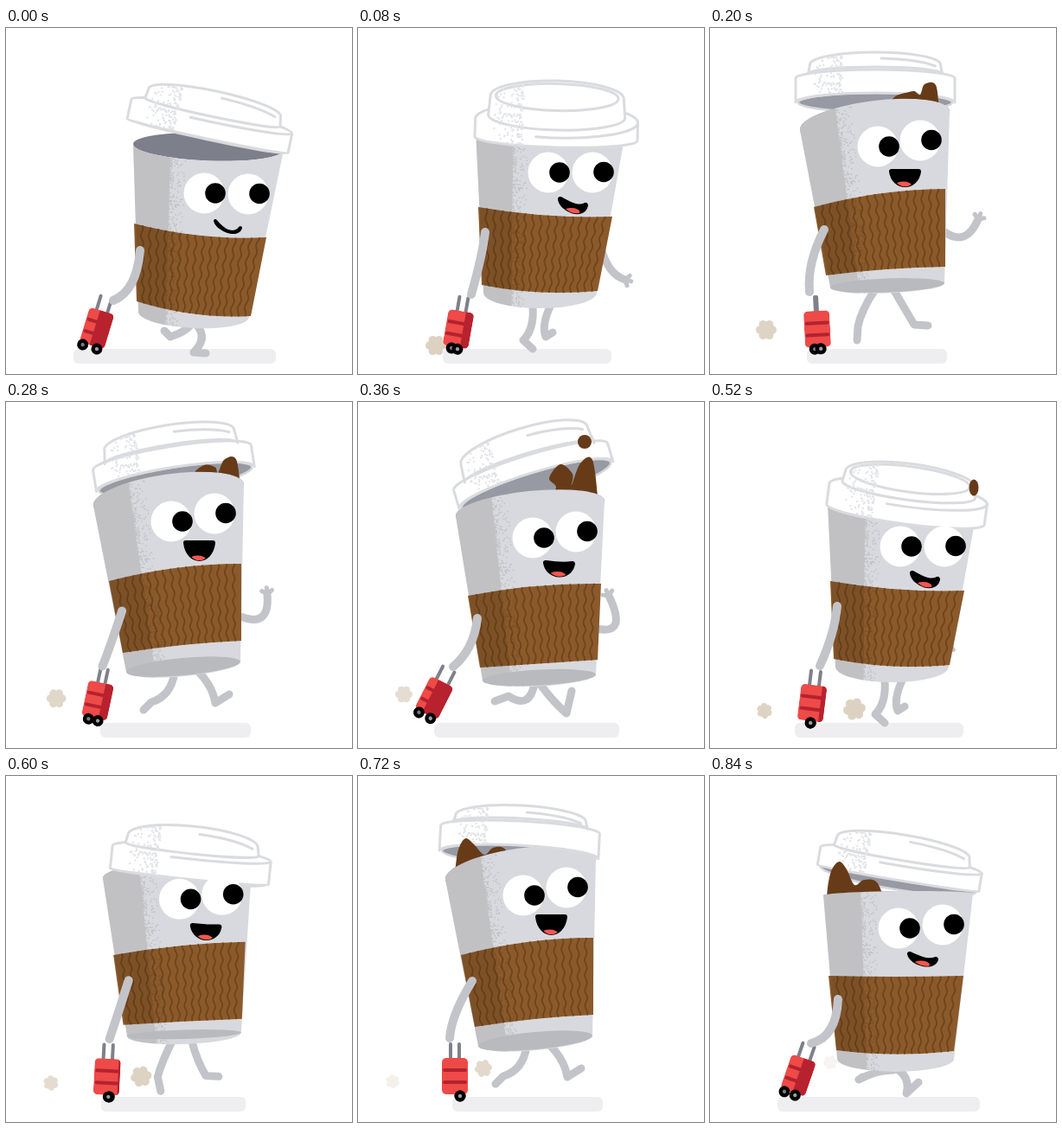
These frames come from a looping animation (400x400 px, 880 ms). An HTML page:

```html
<!DOCTYPE html>
<html lang="en">
<head>
<meta charset="utf-8">
<title>Walking coffee cup</title>
<style>
html, body { margin: 0; width: 100%; height: 100%; overflow: hidden; background: #fff; }
svg { display: block; width: 100vw; height: 100vh; }
.limb { fill: none; stroke: #c3c4c9; stroke-width: 9; stroke-linecap: round; stroke-linejoin: round; }
.lid { fill: #fff; stroke: #dadbdf; stroke-width: 3; stroke-linejoin: round; stroke-linecap: round; }
.line { fill: none; }
</style>
</head>
<body>
<svg viewBox="0 0 400 400">
  <defs>
    <clipPath id="bodyClip"><path id="bodyShape"/></clipPath>
    <clipPath id="rimClip"><path id="rimShape"/></clipPath>
    <clipPath id="mouthClip"><path id="mouthShape"/></clipPath>
    <clipPath id="caseClip"><rect x="-15" y="-21" width="30" height="42" rx="5"/></clipPath>
    <clipPath id="lidClip"><path id="lidShape"/></clipPath>
  </defs>
  <rect id="floor" y="371" height="17" rx="6" fill="#eeeef0"/>
  <g id="puffs" fill="#ddd2c2"></g>
  <path id="farArm" class="limb"/>
  <path id="fingers" class="limb" style="stroke-width:5"/>
  <path id="farLeg" class="limb"/>
  <path id="nearLeg" class="limb"/>
  <ellipse id="inside" fill="#7d808a"/>
  <ellipse id="under" fill="#979aa3" stroke="#d5d6da" stroke-width="2.5"/>
  <path id="body" fill="#d8d9de"/>
  <path id="sleeve" fill="#8b5a2c"/>
  <path id="ribs" fill="none" stroke="#704519" stroke-width="1.9"/>
  <g clip-path="url(#bodyClip)" fill="#1a1008">
    <path id="shade" opacity=".12"/>
    <path id="grain" opacity=".12"/>
  </g>
  <ellipse id="base" fill="#b9babd"/>
  <g id="lid" class="lid">
    <path id="brim"/>
    <path id="edge" class="line"/>
    <path id="dome"/>
    <path id="ring" class="line"/>
    <g clip-path="url(#lidClip)"><path id="lidGrain" fill="#e2e3e7" stroke="none"/></g>
  </g>
  <g clip-path="url(#rimClip)" fill="#673b17">
    <path id="splashR"/>
    <path id="splashL"/>
  </g>
  <ellipse id="drop" fill="#673b17"/>
  <g fill="#fff"><circle id="eyeL" r="23.5"/><circle id="eyeR" r="23.5"/></g>
  <circle id="pupilL" r="11.8"/><circle id="pupilR" r="11.8"/>
  <path id="mouth" stroke="#000" stroke-linejoin="round" stroke-linecap="round"/>
  <ellipse id="tongue" rx="10" ry="5" fill="#f4574f" clip-path="url(#mouthClip)"/>
  <g id="case">
    <path id="handle" fill="none" stroke="#7e818b" stroke-width="4" stroke-linecap="round"/>
    <g clip-path="url(#caseClip)">
      <rect x="-15" y="-21" width="30" height="42" fill="#ee4a48"/>
      <path d="M-12 -7H12M-12 7H12" stroke="#b3222f" stroke-width="4" stroke-linecap="round"/>
      <rect id="side" y="-21" height="42" fill="#b8222f"/>
    </g>
    <circle id="wheelA" cy="23" r="6.5"/><circle id="hubA" cy="23" r="2.2" fill="#777a83"/>
    <circle id="wheelB" cy="23" r="6.5"/><circle id="hubB" cy="23" r="2.2" fill="#9a9ca4"/>
  </g>
  <path id="nearArm" class="limb" style="stroke-width:10"/>
</svg>
<script>
const LOOP = 880, STEP = 440, TICK = 40;
const $ = id => document.getElementById(id);
const set = (id, attrs) => { for (const k in attrs) $(id).setAttribute(k, attrs[k]); };
const mix = (a, b, u) => a + (b - a) * u;

let seed = 7;
const rnd = () => (seed = seed * 16807 % 2147483647) / 2147483647;
const specks = n => Array.from({ length: n }, () => [rnd(), rnd()]);

// Rows are [time, ...values]; smooth periodic interpolation without overshoot.
function key(rows, t, period = LOOP) {
  t %= period;
  const n = rows.length;
  let i = -1;
  while (i + 1 < n && rows[i + 1][0] <= t) i++;
  const at = j => {
    const turn = Math.floor(j / n), row = rows[j - turn * n];
    return [row[0] + turn * period, ...row.slice(1)];
  };
  const [p, a, b, c] = [i - 1, i, i + 1, i + 2].map(at);
  const h = b[0] - a[0], s = (t - a[0]) / h;
  const slope = (x, y) => x * y > 0 ? 2 * x * y / (x + y) : 0;
  return a.slice(1).map((v, k) => {
    k++;
    const d0 = (v - p[k]) / (a[0] - p[0]), d1 = (b[k] - v) / h, d2 = (c[k] - b[k]) / (c[0] - b[0]);
    const m0 = slope(d0, d1) * h, m1 = slope(d1, d2) * h, q = 1 - s;
    return v * (1 + 2 * s) * q * q + m0 * s * q * q + b[k] * s * s * (3 - 2 * s) - m1 * s * s * q;
  });
}

// top-left, top-right, bottom-right, bottom-left, rim bend, base bend, underside
const bodyKeys = [
  [0, 147, 134, 321, 141, 281, 334, 153, 328, 16, 16, 0],
  [80, 136, 118, 309, 122, 276, 306, 145, 306, 12, 18, 0],
  [200, 104, 118, 277, 96, 271, 295, 139, 300, -23, 9, 8],
  [280, 101, 120, 275, 95, 271, 300, 139, 312, -24, 11, 10],
  [360, 113, 132, 285, 114, 275, 315, 144, 322, -20, 10, 9],
  [400, 131, 138, 304, 136, 282, 327, 147, 327, -4, 15, 0]
];
// four corners, top bend, bottom bend
const sleeveKeys = [
  [0, 148, 226, 301, 242, 283, 333, 151, 316, 6, 6],
  [80, 139, 207, 294, 218, 277, 304, 143, 297, 4, 5],
  [200, 120, 207, 272, 186, 272, 276, 134, 286, -5, -2],
  [280, 119, 207, 272, 187, 272, 276, 135, 290, -5, -2],
  [360, 127, 224, 281, 210, 277, 298, 141, 307, -4, 0],
  [400, 137, 231, 293, 231, 282, 318, 146, 317, 1, 4]
];
const eyeKeys = [
  [0, 229, 191, 280, 192], [80, 220, 167, 271, 167], [200, 194, 137, 243, 130],
  [280, 191, 138, 241, 129], [360, 202, 157, 252, 150], [400, 218, 176, 269, 172]
];
// corners, upper lip, lower lip, stroke
const mouthKeys = [
  [0, 242, 223, 271, 231, 8, 8, 4], [80, 234, 198, 263, 205, 3.5, 10, 6],
  [200, 210, 166, 241, 166, 0, 15, 6], [280, 208, 163, 239, 163, 0, 18, 6],
  [360, 217, 186, 248, 187, 1, 13, 6], [400, 231, 206, 261, 212, 3, 8, 6]
];
const floorKeys = [[0, 78, 312], [80, 98, 293], [200, 112, 274], [280, 109, 283], [360, 88, 302], [400, 78, 312]];
// hip, knee, ankle, toe
const legKeys = [
  [0, 220, 343, 234, 358, 217, 375, 231, 376],
  [80, 202, 322, 204, 348, 191, 361, 202, 371],
  [200, 191, 302, 175, 326, 171, 345, 170, 361],
  [280, 195, 312, 191, 340, 168, 347, 159, 356],
  [360, 204, 326, 198, 356, 174, 340, 158, 346],
  [400, 212, 340, 192, 340, 172, 351, 176, 348],
  [440, 214, 343, 206, 352, 190, 357, 183, 350],
  [520, 222, 322, 212, 344, 217, 357, 225, 352],
  [640, 212, 302, 226, 326, 236, 343, 252, 344],
  [720, 214, 304, 238, 324, 242, 348, 258, 338],
  [800, 212, 328, 225, 346, 241, 360, 247, 334],
  [840, 215, 338, 232, 348, 227, 367, 241, 354]
];
// centre, angle, half width, lower bend, brim height, dome height, dome bend, edge bend, underside
const lidKeys = [
  [0, 233, 125, 12, 95, 3, 23, 17, 13, 6, 4],
  [80, 229, 128, 1.5, 94, 10, 21, 27, 19, 20, 5],
  [200, 191, 86, 0, 92, -11, 28, 16, 14, -10, 11],
  [360, 206, 96, -17, 93, -15, 22, 26, 20, -14, 15],
  [440, 224, 116, -3, 93, -1, 22, 21, 18, 3, 12],
  [520, 226, 130, 7.5, 92, 11, 24, 17, 18, 15, 5],
  [720, 186, 91, 3, 92, -11, 29, 13, 15, -10, 11],
  [840, 217.5, 118.5, 9.4, 94.5, 2, 21, 16, 14, 6, 13]
];
// shoulder, elbow, hand
const nearArmKeys = [
  [0, 155, 257, 151, 304, 124, 315], [80, 147, 236, 144, 262, 131, 308],
  [200, 132, 233, 112, 272, 115, 305], [360, 138, 250, 134, 286, 110, 306],
  [520, 147, 236, 144, 268, 127, 305], [720, 132, 237, 108, 276, 106, 303],
  [840, 148, 258, 146, 302, 117, 309]
];
const farArmKeys = [
  [0, 270, 260, 272, 290, 262, 290], [80, 280, 250, 288, 285, 309, 291],
  [200, 270, 235, 296, 254, 310, 221], [360, 276, 262, 312, 270, 290, 224],
  [520, 272, 255, 278, 278, 277, 281], [720, 255, 245, 255, 265, 245, 270],
  [840, 262, 258, 262, 280, 250, 282]
];
// centre, angle, dark side, wheels, handle gap
const caseKeys = [
  [0, 105, 347, 17, .58, -10, 7, 6.5], [80, 116, 348, 10, .32, -4, 3, 5],
  [200, 124, 348, -3, 0, -4, 3, 1], [360, 88, 342, 27, .66, -8, 7, 7.5],
  [520, 118, 348, 7, .18, 1, 1, 5.5], [720, 112, 347, 0, 0, 6, 6, 5],
  [840, 102, 346, 19, .5, -9, 4, 7]
];
// position, radius, opacity
const puffKeys = [
  [[0, 100, 372, 4, 0], [40, 97, 370, 8, 1], [80, 90, 367, 12, 1], [200, 65, 349, 12, .95], [360, 53, 338, 10, .75], [440, 48, 334, 8, 0]],
  [[400, 100, 370, 3, 0], [440, 85, 366, 9, 1], [520, 63, 357, 9, .95], [720, 40, 353, 8, .3], [800, 34, 352, 7, 0]],
  [[440, 185, 365, 4, 0], [480, 176, 360, 10, 1], [520, 167, 355, 13, 1], [720, 145, 338, 10, .85], [840, 139, 331, 8, .22], [879, 137, 329, 7, 0]]
];
const dropKeys = [
  [280, 265, 76, 7, 7], [320, 262, 57, 8, 8], [360, 262, 46, 8, 8],
  [440, 290, 62, 7, 8], [520, 305, 99, 5.5, 9.5], [560, 307, 118, 4, 9]
];
const sunk = (row, t, dy) => row.map((v, i) => i ? (i % 2 ? v : v + dy) : t);
const right1 = [200, 207, 97, 209, 85, 216, 78, 226, 75, 236, 73, 243, 77, 248, 65, 261, 66, 265, 98];
const right2 = [360, 218, 116, 229, 99, 221, 88, 234, 72, 248, 83, 247, 96, 257, 71, 271, 67, 278, 118];
const left1 = [720, 111, 125, 114, 95, 118, 80, 125, 72, 134, 79, 146, 91, 156, 83, 168, 83, 178, 96];
const left2 = [840, 134, 150, 137, 122, 142, 106, 150, 99, 158, 108, 167, 126, 178, 120, 192, 122, 201, 140];
const splashR = [sunk(right1, 120, 50), right1, right2, sunk(right2, 440, 100)];
const splashL = [sunk(left1, 600, 45), left1, left2, sunk(left2, 880, 60)];

const bodySpecks = specks(420), lidSpecks = specks(150);
const dot = (x, y, s) => `M${x.toFixed(1)} ${y.toFixed(1)}h${s}v${s}h${-s}z`;

// Half ellipse between two points; rise > 0 bends it down.
function arc(x0, y0, x1, y1, rise) {
  const rx = Math.hypot(x1 - x0, y1 - y0) / 2;
  const rot = Math.atan2(y1 - y0, x1 - x0) * 180 / Math.PI;
  const sweep = (x1 > x0) === (rise < 0) ? 1 : 0;
  return `A${rx} ${Math.max(.1, Math.abs(rise))} ${rot} 0 ${sweep} ${x1} ${y1}`;
}

function oval(id, x0, y0, x1, y1, ry) {
  const cx = (x0 + x1) / 2, cy = (y0 + y1) / 2;
  const rot = Math.atan2(y1 - y0, x1 - x0) * 180 / Math.PI;
  set(id, { cx, cy, rx: Math.hypot(x1 - x0, y1 - y0) / 2, ry: Math.max(0, ry), transform: `rotate(${rot} ${cx} ${cy})` });
}

function drawCup(t) {
  const [ax, ay, bx, by, cx, cy, dx, dy, rim, foot, under] = key(bodyKeys, t, STEP);
  const at = (u, v) => [mix(mix(ax, bx, u), mix(dx, cx, u), v), mix(mix(ay, by, u), mix(dy, cy, u), v)];
  const top = arc(ax, ay, bx, by, rim);
  const d = `M${ax} ${ay}${top}L${cx} ${cy}${arc(cx, cy, dx, dy, foot)}Z`;
  set('body', { d });
  set('bodyShape', { d });
  set('rimShape', { d: `M0 0V${ay}H${ax}${top}H400V0Z` });
  oval('inside', ax, ay, bx, by, Math.abs(rim));
  oval('base', dx, dy, cx, cy, under);
  set('shade', { d: `M${at(-.1, -.3)}L${at(.25, -.3)}L${at(.25, 1.2)}L${at(-.1, 1.2)}Z` });
  set('grain', { d: bodySpecks.map(([a, b]) => dot(...at(.25 + .1 * a * a, b * 1.3 - .2), 1.5)).join('') });

  const [ex, ey, fx, fy, gx, gy, hx, hy, bt, bb] = key(sleeveKeys, t, STEP);
  const midTop = `${(ex + fx) / 2} ${(ey + fy) / 2 + 2 * bt}`, midLow = `${(gx + hx) / 2} ${(gy + hy) / 2 + 2 * bb}`;
  set('sleeve', { d: `M${ex} ${ey}Q${midTop} ${fx} ${fy}L${gx} ${gy}Q${midLow} ${hx} ${hy}Z` });
  let ribs = '';
  for (let i = 1; i < 17; i++) {
    const u = i / 17, bend = 4 * u * (1 - u);
    for (let j = 0; j <= 30; j++) {
      const v = j / 30, wave = 1.4 * Math.sin(v * 32 + i * .5);
      const x = mix(mix(ex, fx, u), mix(hx, gx, u), v) + wave;
      const y = mix(mix(ey, fy, u) + bt * bend, mix(hy, gy, u) + bb * bend, v);
      ribs += `${j ? 'L' : 'M'}${x.toFixed(1)} ${y.toFixed(1)}`;
    }
  }
  set('ribs', { d: ribs });
}

function drawFace(t) {
  const [lx, ly, rx, ry] = key(eyeKeys, t, STEP);
  set('eyeL', { cx: lx, cy: ly });
  set('eyeR', { cx: rx, cy: ry });
  set('pupilL', { cx: lx + 13, cy: ly });
  set('pupilR', { cx: rx + 13, cy: ry - .5 });
  const [ax, ay, bx, by, up, low, w] = key(mouthKeys, t, STEP);
  const shape = k => `M${ax} ${ay}C${ax + 9} ${ay + up * 4 / 3} ${bx - 9} ${by + up * 4 / 3} ${bx} ${by}`
    + `C${bx - 3} ${by + k * 4 / 3} ${ax + 3} ${ay + k * 4 / 3} ${ax} ${ay}Z`;
  set('mouth', { d: shape(low), 'stroke-width': w });
  set('mouthShape', { d: shape(low + 2.3) });
  set('tongue', { cx: (ax + bx) / 2 - 2, cy: (ay + by) / 2 + low + 1.5, opacity: low - up > 2 ? 1 : 0 });
}

function drawLid(t) {
  const [x, y, a, w, bend, h, rise, domeR, edge, under] = key(lidKeys, t);
  const transform = `translate(${x} ${y}) rotate(${a})`;
  set('lid', { transform });
  set('under', { transform, rx: w - 3, ry: under });
  const back = Math.max(10, Math.abs(edge)), p = w * .82, foot = -h - 5, top = -h - rise;
  const brim = `M${-w} 0L${-w} ${-h}${arc(-w, -h, w, -h, -back)}L${w} 0${arc(w, 0, -w, 0, bend)}Z`;
  const dome = `M${-p - 2} ${foot}L${-p} ${top}${arc(-p, top, p, top, -domeR)}L${p + 2} ${foot}${arc(p + 2, foot, -p - 2, foot, edge * .8)}Z`;
  set('brim', { d: brim });
  set('dome', { d: dome });
  set('lidShape', { d: brim + dome });
  const above = edge > 0;
  set('edge', { d: above ? `M${-w * .25} ${-h + edge * .97}A${w} ${edge} 0 0 0 ${w} ${-h}` : '' });
  const q = p * .92, r = domeR * .82;
  set('ring', { d: edge > 10
    ? `M${-q} ${top}${arc(-q, top, q, top, -r)}${arc(q, top, -q, top, r)}`
    : `M${q * .1} ${top - r * .6}Q${q * .7} ${top - r * .5} ${q} ${top + 2}` });
  set('lidGrain', { d: lidSpecks.map(([u, v]) =>
    dot(mix(-w * .78, -w * .42, Math.sqrt(u)), mix(top - domeR + 3, 8, v), 2)).join('') });
}

function drawSplash(id, rows, t) {
  const first = rows[0][0], last = rows[rows.length - 1][0];
  if (t <= first || t >= last) return set(id, { d: '' });
  const v = key(rows, t), pts = [];
  for (let i = 0; i < v.length; i += 2) pts.push([v[i], v[i + 1]]);
  const n = pts.length, P = i => pts[Math.max(0, Math.min(n - 1, i))];
  let d = `M${pts[0]}`;
  for (let i = 0; i < n - 1; i++) {
    const [a, b, c, e] = [P(i - 1), P(i), P(i + 1), P(i + 2)];
    d += `C${b.map((q, k) => q + (c[k] - a[k]) / 6)} ${c.map((q, k) => q - (e[k] - b[k]) / 6)} ${c}`;
  }
  set(id, { d: `${d}V190H${pts[0][0]}Z` });
}

function drawLimbs(t) {
  const leg = (id, time) => {
    const [a, b, c, d, e, f, g, h] = key(legKeys, time);
    set(id, { d: `M${a} ${b}Q${c} ${d} ${e} ${f}L${g} ${h}` });
  };
  leg('nearLeg', t);
  leg('farLeg', t + STEP);
  const arm = (id, rows) => {
    const [a, b, c, d, e, f] = key(rows, t);
    set(id, { d: `M${a} ${b}Q${c} ${d} ${e} ${f}` });
    return [e, f, Math.atan2(f - d, e - c)];
  };
  arm('nearArm', nearArmKeys);
  const [x, y, dir] = arm('farArm', farArmKeys);
  set('fingers', { d: [-1, 0, 1].map(k =>
    `M${x} ${y}L${x + 7 * Math.cos(dir + k)} ${y + 7 * Math.sin(dir + k)}`).join('') });
}

function drawCase(t) {
  const [x, y, a, side, w1, w2, gap] = key(caseKeys, t);
  set('case', { transform: `translate(${x} ${y}) rotate(${a})` });
  set('side', { x: 15 - 30 * side, width: 30 * side });
  set('handle', { d: `M${-gap} -20V-37M${gap} -20V-37` });
  set('wheelA', { cx: w1 });
  set('hubA', { cx: w1 });
  set('wheelB', { cx: w2 });
  set('hubB', { cx: w2 });
}

const lobes = Array.from({ length: 6 }, (_, i) =>
  `<circle cx="${.6 * Math.cos(i * Math.PI / 3)}" cy="${.6 * Math.sin(i * Math.PI / 3)}" r=".4"/>`).join('');
$('puffs').innerHTML = puffKeys.map((_, i) => `<g id="puff${i}"><circle r=".6"/>${lobes}</g>`).join('');

function draw(t) {
  const [left, right] = key(floorKeys, t, STEP);
  set('floor', { x: left, width: right - left });
  puffKeys.forEach((rows, i) => {
    const [x, y, r, opacity] = key(rows, t);
    set('puff' + i, { transform: `translate(${x} ${y}) rotate(${i * 25}) scale(${r})`, opacity });
  });
  drawLimbs(t);
  drawCup(t);
  drawFace(t);
  drawLid(t);
  drawSplash('splashR', splashR, t);
  drawSplash('splashL', splashL, t);
  const [x, y, rx, ry] = key(dropKeys, t);
  set('drop', { cx: x, cy: y, rx, ry, opacity: t >= 320 && t <= 560 ? 1 : 0 });
  drawCase(t);
}

const start = performance.now();
function tick() {
  const t = (performance.now() - start) % LOOP;
  draw(Math.floor(t / TICK) * TICK);
  requestAnimationFrame(tick);
}
tick();
</script>
</body>
</html>
```
